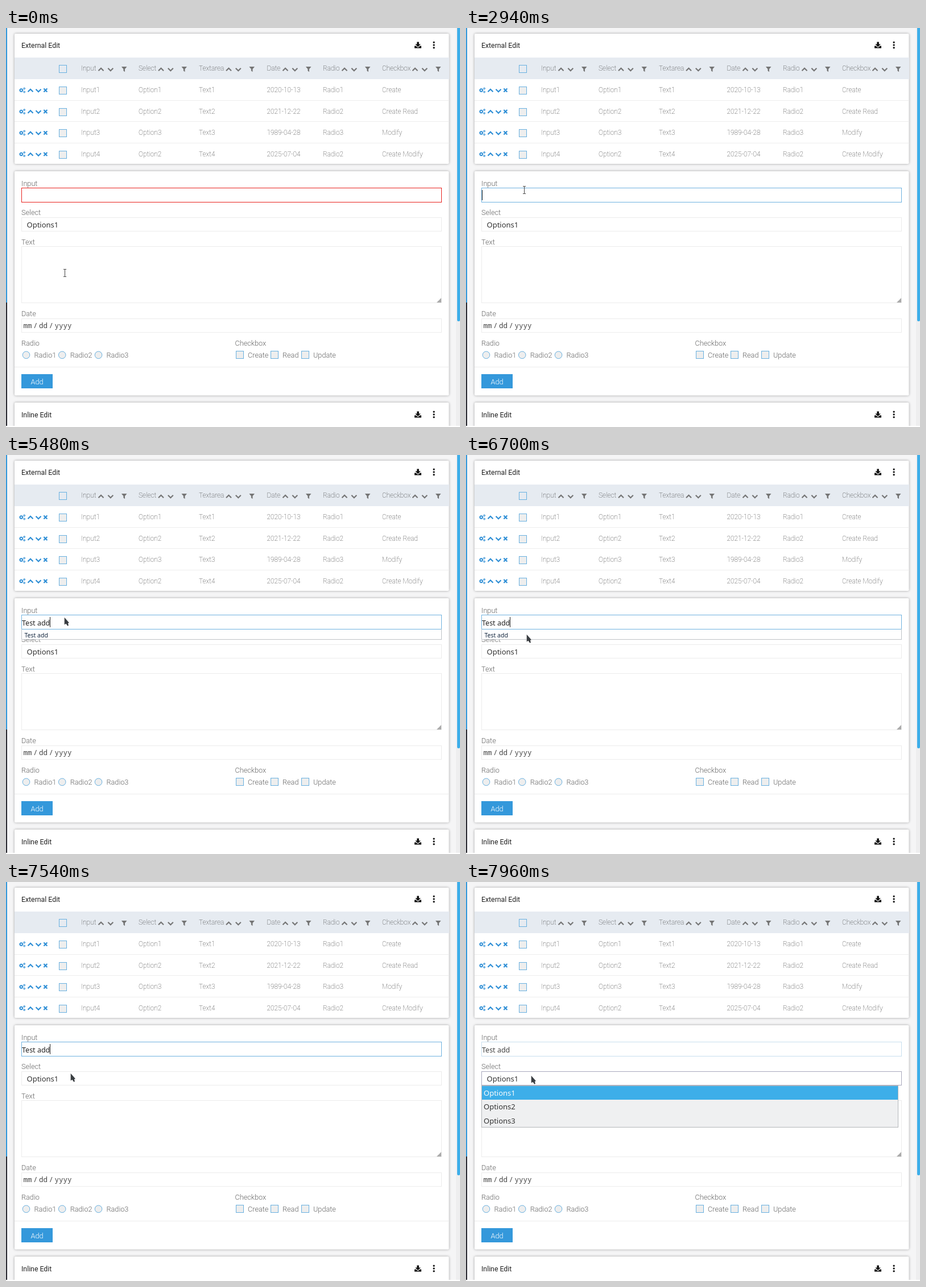
Write an HTML page that moves like this. It is 798 px wide and 702 px high and loops after 8 s.

```html
<!DOCTYPE html>
<html lang="en">
<head>
<meta charset="utf-8">
<title>External Edit</title>
<style>
html, body { margin: 0; width: 100%; height: 100%; overflow: hidden; background: #f5f5f6; }
svg { display: block; width: 798px; height: 702px; }
text { white-space: pre; }
.title { font: 400 12.3px Roboto, sans-serif; fill: #222; }
.cell { font: 100 11.9px Roboto, sans-serif; fill: #333; }
.label { font: 300 12.7px Roboto, sans-serif; fill: #666; }
.field { font: 13px "Noto Sans", sans-serif; fill: #333; }
.typed { font: 12.5px "Noto Sans", sans-serif; }
.hint { font: 10.5px "Noto Sans", sans-serif; fill: #12263e; }
.date { font: 12.5px "Noto Sans Mono", monospace; fill: #444; }
.card { fill: #fff; filter: drop-shadow(0 0 2px rgba(0,0,0,.35)); }
.box { fill: #eee; stroke: #68b0e0; }
.frame { fill: #fff; stroke: #ececec; }
.chevron { fill: none; stroke-width: 2.2; }
</style>
</head>
<body>
<svg id="stage" viewBox="0 0 798 702"></svg>
<script>
const LOOP = 8000;
const BLUE = '#3498db', ICON = '#2f8fd6', GREY = '#757575', FOCUS = '#70b2e0';

const text = (x, y, s, cls, extra = '') => `<text x="${x}" y="${y}" class="${cls}" ${extra}>${s}</text>`;
const rect = (x, y, w, h, extra) => `<rect x="${x}" y="${y}" width="${w}" height="${h}" ${extra}/>`;
const path = (d, extra = '') => `<path d="${d}" ${extra}/>`;
const hline = (y, color) => rect(15, y, 764, 1, `fill="${color}"`);
const card = (y, h) => rect(15, y, 763.5, h, 'rx="2" class="card"');
const checkbox = (cx, cy, extra = '') => rect(cx - 6.5, cy - 6.5, 13, 13, `class="box" ${extra}`);
const frame = (y, h, id = '') => rect(27.5, y, 738, h, `class="frame" ${id}`);

// dir is -1 for up, 1 for down
const chevron = (x, y, dir, color) =>
  path(`M${x - 4.5} ${y - 2.2 * dir}l4.5 ${4.4 * dir}l4.5 ${-4.4 * dir}`, `class="chevron" stroke="${color}"`);

const funnel = (x, y) => path(`M${x - 4.8} ${y - 4.5}h9.6l-3.5 4.3v5l-2.6 -2v-3z`, `fill="${GREY}"`);

const gear = (x, y, r, width) =>
  `<circle cx="${x}" cy="${y}" r="${r}" fill="none" stroke="${ICON}" stroke-width="${width}"/>` +
  `<circle cx="${x}" cy="${y}" r="${r + width / 2}" fill="none" stroke="${ICON}" stroke-width="1"
    stroke-dasharray="${(r + width / 2) * Math.PI / 8}"/>`;

const rowTools = y =>
  gear(26.8, y, 2.2, 1.8) + gear(32.2, y - 3, 1.1, 1) + gear(32.2, y + 3, 1.1, 1) +
  chevron(43, y + .5, -1, ICON) + chevron(57, y + .5, 1, ICON) +
  path(`M66.4 ${y - 3}l6 6m0 -6l-6 6`, `class="chevron" stroke="${ICON}"`);

const cardTitle = (y, s) =>
  text(27, y + 4.6, s, 'title') +
  path(`M722.3 ${y - 5.5}h3.6v4h3l-4.8 4.7l-4.8 -4.7h3z
        M718 ${y + 1.5}h2.6l3.5 3l3.5 -3h2.4v4h-12z`, 'fill="#111"') +
  [-4.7, 0, 4.7].map(d => rect(750.6, y + d - 1.5, 3, 3, 'rx="1" fill="#111"')).join('');

const columns = [
  ['Input', 132, 167], ['Select', 233, 272.5], ['Textarea', 339, 391.5],
  ['Date', 458.5, 491], ['Radio', 557, 595], ['Checkbox', 661, 719]
];
const rows = [
  ['Input1', 'Option1', 'Text1', '2020-10-13', 'Radio1', 'Create'],
  ['Input2', 'Option2', 'Text2', '2021-12-22', 'Radio2', 'Create Read'],
  ['Input3', 'Option3', 'Text3', '1989-04-28', 'Radio3', 'Modify'],
  ['Input4', 'Option2', 'Text4', '2025-07-04', 'Radio2', 'Create Modify']
];

function table() {
  let out = card(10, 229) + cardTitle(30, 'External Edit') +
    rect(15, 52, 764, 38, 'fill="#e6ebf1"') + checkbox(100, 72, 'style="fill:#e6ebf1"');
  for (const [name, x, icon] of columns) {
    out += text(x, 74.5, name, 'cell') + chevron(icon, 73, -1, GREY) +
      chevron(icon + 16.8, 73, 1, GREY) + funnel(icon + 40.7, 72.5);
  }
  rows.forEach((cells, i) => {
    const y = 109 + 37.5 * i;
    if (i) out += hline(Math.floor(y - 19.5), '#ededed');
    out += rowTools(y + .5) + checkbox(100, Math.round(y + 1.4)) +
      cells.map((s, c) => text(columns[c][1], y + 4.2, s, 'cell')).join('');
  });
  return out;
}

function form() {
  const labels = [['Input', 277.5], ['Select', 329], ['Text', 381], ['Date', 507], ['Radio', 558.5]];
  let out = card(252, 394.5) + labels.map(([s, y]) => text(27, y, s, 'label')).join('') +
    text(402.5, 558.5, 'Checkbox', 'label') +
    frame(281.5, 25, 'id="input"') + frame(333.5, 24, 'id="select"') + frame(384.5, 99) + frame(511.5, 24) +
    text(36.5, 351, 'Options1', 'field') +
    path('M757 483l8 -8v8z', 'fill="#aaa"');
  [['mm', 30], ['/', 47.5], ['dd', 57.5], ['/', 75], ['yyyy', 85]].forEach(([s, x]) =>
    out += text(x + .4, 528, s, 'date'));
  [35.5, 98.7, 162.5].forEach((x, i) =>
    out += `<circle cx="${x}" cy="575.3" r="6.3" class="box"/>` + text(x + 14, 579.7, 'Radio' + (i + 1), 'label'));
  [['Create', 411], ['Read', 472], ['Update', 526]].forEach(([s, x]) =>
    out += checkbox(x, 575) + text(x + 14, 579.7, s, 'label'));
  return out + hline(596, '#ececec') + rect(27, 609, 55, 25, `fill="${BLUE}"`) +
    text(54.5, 627, 'Add', 'label', 'text-anchor="middle" style="fill:#fff"');
}

const popups =
  text(28, 299.5, '', 'typed', 'id="typed"') + rect(0, 285, 1, 18, 'id="caret" fill="#222"') +
  `<g id="hints">${rect(27.5, 306.5, 738, 18, 'fill="#fff" stroke="#bfc3c7"')}
    ${rect(28, 306, 737, 1, `fill="${FOCUS}"`)}
    ${rect(29, 308, 736, 16, 'id="hover" fill="#e4eaf0"')}${text(32.5, 320.5, 'Test add', 'hint')}</g>` +
  `<g id="menu">${rect(27.5, 358.5, 732, 73, 'fill="#eff0f1" stroke="#b4b7ba"')}
    ${rect(28, 359, 731, 24, 'fill="#3daee9"')}
    ${[1, 2, 3].map(n => text(31, 352 + 24.2 * n, 'Options' + n, 'field', n === 1 ? 'style="fill:#fcfcfc"' : '')).join('')}</g>`;

// Both pointers are drawn from the top left of their bounds.
const pointers =
  path('M0 .5h2q.5 0 .5 .6q0 -.6 .5 -.6h2M2.5 1v12M0 13.5h2q.5 0 .5 -.6q0 .6 .5 .6h2',
    'id="beam" fill="none" stroke="#444"') +
  path('M.7 .7V13.4L3.5 11.8L6.2 15.8L8 14.8L6.8 11L9 10.2Z',
    'id="arrow" fill="#393d41" stroke="#fff" stroke-width=".7" paint-order="stroke"');

const stage = document.getElementById('stage');
stage.innerHTML =
  rect(0, 0, 798, 702, 'fill="#f5f5f6"') + rect(0, 0, 2, 483, `fill="${BLUE}"`) + rect(0, 483, 2, 217, 'fill="#2c2c34"') +
  rect(791, 0, 7, 702, 'fill="#eeeeef"') + rect(793, -9, 5, 525, 'rx="2" fill="#3daee9"') +
  table() + form() + card(659, 60) + cardTitle(680, 'Inline Edit') +
  rect(0, 700, 798, 2, 'fill="#fff"') + popups + pointers;

const beam = (x, y) => ({ pointer: 'beam', x, y });
const arrow = (x, y) => ({ pointer: 'arrow', x, y });
const typed = (value, caret) => ({ value, caret });

const initial = {
  ...beam(101, 424), value: '', caret: 0, hints: false, hover: false, menu: false,
  inputLine: '#e8221f', selectLine: '#ececec', ink: '#222'
};

// The pointer glides up from the text area, turning into an arrow over the select.
const glide = Array.from({ length: 10 }, (_, i) => {
  const p = i / 9, y = 426 - 145 * p * p * (3 - 2 * p), x = 101 - 2 * p + 5 * Math.sin(Math.PI * p);
  const overSelect = y > 322 && y < 378;
  return [540 + 420 * p, overSelect ? arrow(x, y + 6) : beam(x, y)];
});

const events = [
  [280, { pointer: '' }],
  ...glide,
  [1120, beam(99, 282)], [1180, beam(99, 279)], [1240, beam(98.5, 275)],
  [2940, { ...beam(100, 278), inputLine: FOCUS, caret: 28 }],
  [3480, { caret: 0 }],
  [3520, { ...arrow(102, 285), ...typed('T', 35) }],
  [3800, { ...typed('Te', 41), hints: true }],
  [4060, typed('Tes', 47)],
  [4200, typed('Test', 51)],
  [4340, typed('Test ', 54)],
  [4640, typed('Test a', 61)],
  [5020, { caret: 0 }],
  [5180, typed('Test ad', 69)],
  [5480, typed('Test add', 77)],
  [6440, arrow(91, 287)],
  [6700, arrow(106, 315)],
  [6840, { ...arrow(108, 319), hover: true }],
  [7000, arrow(109, 323)],
  [7140, { ...arrow(108, 333), hover: false }],
  [7300, arrow(109, 334)],
  [7540, { ...arrow(113, 336), hints: false }],
  [7680, { ...arrow(114, 340), caret: 0, menu: true, ink: '#444', selectLine: '#cfcfdc' }],
  [7960, { inputLine: '#c8dfef', selectLine: '#a9a9bd' }]
];

const el = id => document.getElementById(id);
const show = (id, on) => el(id).setAttribute('visibility', on ? 'inherit' : 'hidden');

function draw() {
  const t = performance.now() % LOOP;
  const s = Object.assign({}, initial, ...events.filter(([at]) => at <= t).map(([, change]) => change));
  el('input').style.stroke = s.inputLine;
  el('select').style.stroke = s.selectLine;
  el('typed').textContent = s.value;
  el('typed').style.fill = s.ink;
  el('caret').setAttribute('x', s.caret);
  show('caret', s.caret);
  show('hints', s.hints);
  show('hover', s.hints && s.hover);
  show('menu', s.menu);
  for (const id of ['beam', 'arrow']) {
    show(id, s.pointer === id);
    el(id).setAttribute('transform', `translate(${s.x} ${s.y})`);
  }
  requestAnimationFrame(draw);
}
draw();
</script>
</body>
</html>
```
